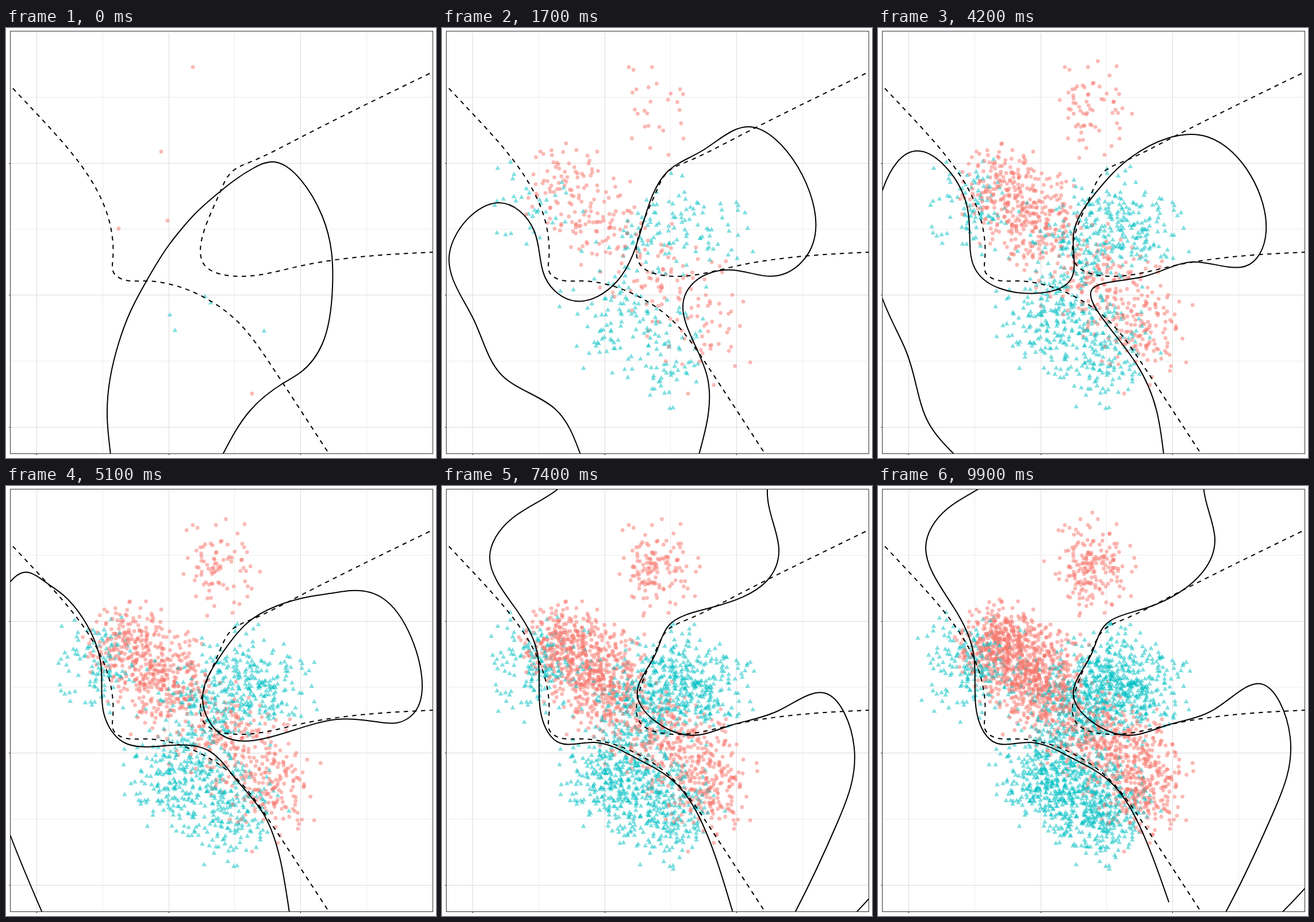
An HTML page with a canvas that plays this animation: 748x748 px, repeating every 10000 ms.

```html
<!DOCTYPE html>
<html lang="en">
<head>
<meta charset="utf-8">
<title>Decision boundary</title>
<style>
html, body { margin: 0; width: 100%; height: 100%; overflow: hidden; background: #fff; }
canvas { display: block; width: 100vw; height: 100vh; }
</style>
</head>
<body>
<canvas id="plot" width="748" height="748"></canvas>
<script>
const ctx = document.getElementById('plot').getContext('2d');
const STEPS = 100, STEP_MS = 100, PER_STEP = 36, SPLIT = 48;
const RED = '#F8766D', TEAL = '#00BFC4';
const BOX = { x: 7.5, y: 5.5, size: 735 };

const path = text => text.trim().split(/\s+/).map(p => p.split(',').map(Number));
const mix = (a, b, u) => a.map(([x, y], i) => [x + (b[i][0] - x) * u, y + (b[i][1] - y) * u]);

// Key points of the fitted boundary: one outline, then two
const blob = path(`182,742 176,675 181,610 196,548 217,492 245,439 262,410 283,378 305,350 330,322 373,284
  400,263 430,244 467,233 550,327 568,450 550,550 515,597 482,618 425,665 377,742`);
const folded = path(`241,742 196,662 105,605 55,507 13,392 98,304 160,352 180,435 232,475 305,440 350,339
  392,250 455,212 537,172 649,360 582,431 505,421 440,441 419,485 461,605 447,742`);
const necked = path(`133,742 88,687 66,620 48,560 -8,400 65,214 152,300 165,410 212,453 335,438 340,360
  380,285 440,225 575,190 675,355 640,414 550,407 460,433 372,455 450,585 497,742`);
const leftClosed = path(`63,742 8,609 -40,400 8,166 35,150 70,168 100,190 135,232 165,310 170,395 205,446
  275,452 350,459 400,510 450,574 493,742`);
const leftOpen = path(`-90,742 -90,500 -90,-80 225,-30 202,5 120,58 83,125 132,219 167,297 173,400 205,447
  265,446 335,472 400,511 447,575 506,742`);
const rightClosed = path(`600,182 655,195 724,350 712,392 698,405 680,412 650,411 620,407 575,406 490,428 380,436
  342,370 370,300 420,238 470,209 530,192 570,186`);
const rightOpen = path(`566,5 700,-150 950,350 570,840 614,742 688,585 717,455 665,360 585,391 500,417 425,433
  340,365 370,295 395,242 470,211 565,165 586,110`);

const trueBoundary = [
  path('12,105 57,153 130,238 178,330 186,400 187,425 205,438 245,440 320,457 400,508 460,585 562,741'),
  path('737,79 513,190 430,231 392,251 370,291 340,370 345,412 410,432 512,414 640,396 743,390')
];

// Clusters: weight, centre x, y, spread x, y
const redMix = [[.12, 372, 142, 31, 38], [.24, 213, 277, 34, 36], [.31, 281, 342, 40, 42], [.16, 383, 438, 48, 37], [.17, 463, 515, 35, 44]];
const tealMix = [[.11, 172, 318, 46, 40], [.28, 426, 345, 48, 42], [.14, 345, 385, 40, 40], [.23, 300, 507, 41, 38], [.24, 384, 562, 41, 42]];

let seed = 20417;
function rand() {
  seed = (seed + 0x6D2B79F5) | 0;
  let t = Math.imul(seed ^ (seed >>> 15), 1 | seed);
  t = (t + Math.imul(t ^ (t >>> 7), 61 | t)) ^ t;
  return ((t ^ (t >>> 14)) >>> 0) / 4294967296;
}

function sample(clusters) {
  let pick = rand(), i = 0;
  while (i < clusters.length - 1 && pick > clusters[i][0]) pick -= clusters[i++][0];
  const [, cx, cy, sx, sy] = clusters[i];
  const r = Math.sqrt(-2 * Math.log(1 - rand() * .975));
  const a = rand() * 2 * Math.PI;
  return [cx + sx * r * Math.cos(a), cy + sy * r * Math.sin(a)];
}

const points = [
  ...path('325,68 270,215 281,335 196,349 428,636').map(at => ({ at, red: true })),
  ...path('346,467 356,478 285,499 294,526 449,527').map(at => ({ at, red: false }))
];
const firstCount = points.length;
for (let i = 0; i < (STEPS - 1) * PER_STEP; i++) {
  const red = rand() < .5;
  points.push({ at: sample(red ? redMix : tealMix), red });
}

// Late on, the far parts of the boundary creep upward
function creep(pts, u) {
  return pts.map(([x, y]) => {
    const far = Math.max(0, Math.min(1, (Math.hypot(x - 340, y - 400) - 230) / 110));
    return [x, y - 18 * u * far];
  });
}

function outlines(step) {
  if (step < 17) return [{ pts: mix(blob, folded, step / 17) }];
  if (step < SPLIT) return [{ pts: mix(folded, necked, (step - 17) / 25) }];
  const u = Math.max(0, Math.min(1, (step - 59) / 15));
  const v = Math.max(0, (step - 74) / 25);
  return [
    { pts: creep(mix(leftClosed, leftOpen, u), v) },
    { pts: creep(mix(rightClosed, rightOpen, u), v), closed: true }
  ];
}

// Smooth cubic spline; its tangents are solved by relaxation
function strokeSpline({ pts, closed = false }) {
  const n = pts.length, segs = closed ? n : n - 1;
  const next = i => (i + 1) % n, prev = i => (i + n - 1) % n;
  const h = pts.map((p, i) => Math.hypot(pts[next(i)][0] - p[0], pts[next(i)][1] - p[1]) ** .75);
  const slope = (i, k) => (pts[next(i)][k] - pts[i][k]) / h[i];
  const m = pts.map(() => [0, 0]);
  for (let pass = 0; pass < 40; pass++) {
    for (let i = 0; i < n; i++) {
      const j = prev(i);
      for (const k of [0, 1]) {
        if (!closed && i === 0) m[i][k] = (3 * slope(0, k) - m[1][k]) / 2;
        else if (!closed && i === n - 1) m[i][k] = (3 * slope(j, k) - m[j][k]) / 2;
        else m[i][k] = (3 * (h[i] * slope(j, k) + h[j] * slope(i, k)) - h[i] * m[j][k] - h[j] * m[next(i)][k]) / (2 * (h[i] + h[j]));
      }
    }
  }
  ctx.beginPath();
  ctx.moveTo(...pts[0]);
  for (let i = 0; i < segs; i++) {
    const j = next(i), d = h[i] / 3, [p, q] = [pts[i], pts[j]];
    ctx.bezierCurveTo(p[0] + m[i][0] * d, p[1] + m[i][1] * d, q[0] - m[j][0] * d, q[1] - m[j][1] * d, ...q);
  }
  ctx.stroke();
}

function drawGrid(xs, ys, color) {
  ctx.strokeStyle = color;
  ctx.lineWidth = 1;
  ctx.beginPath();
  xs.forEach(x => { ctx.moveTo(x, BOX.y); ctx.lineTo(x, BOX.y + BOX.size); });
  ys.forEach(y => { ctx.moveTo(BOX.x, y); ctx.lineTo(BOX.x + BOX.size, y); });
  ctx.stroke();
}

function drawPoint({ at: [x, y], red }) {
  ctx.fillStyle = red ? RED : TEAL;
  ctx.beginPath();
  if (red) {
    ctx.arc(x, y, 3.4, 0, 2 * Math.PI);
  } else {
    ctx.moveTo(x, y - 4.8);
    ctx.lineTo(x + 4.3, y + 2.8);
    ctx.lineTo(x - 4.3, y + 2.8);
  }
  ctx.fill();
}

const majorX = [53.5, 283.5, 512.5], majorY = [235.5, 464.5, 694.5];

function draw(step) {
  ctx.fillStyle = '#fff';
  ctx.fillRect(0, 0, 748, 748);
  drawGrid([168.5, 397.5, 627.5], [120.5, 350, 579.5], '#ececec');
  drawGrid(majorX, majorY, '#dcdcdc');

  ctx.save();
  ctx.beginPath();
  ctx.rect(BOX.x, BOX.y, BOX.size, BOX.size);
  ctx.clip();
  ctx.globalAlpha = .5;
  points.slice(0, firstCount + step * PER_STEP).forEach(drawPoint);
  ctx.globalAlpha = 1;
  ctx.strokeStyle = '#000';
  ctx.lineWidth = 2;
  ctx.setLineDash([7.5, 7.5]);
  trueBoundary.forEach(pts => strokeSpline({ pts }));
  ctx.setLineDash([]);
  outlines(step).forEach(strokeSpline);
  ctx.restore();

  ctx.strokeStyle = '#333';
  ctx.lineWidth = 1;
  ctx.strokeRect(BOX.x, BOX.y, BOX.size, BOX.size);
  ctx.beginPath();
  majorX.forEach(x => { ctx.moveTo(x, 740); ctx.lineTo(x, 743); });
  majorY.forEach(y => { ctx.moveTo(5, y); ctx.lineTo(8, y); });
  ctx.stroke();
}

const start = performance.now();
let shown = -1;
function tick() {
  const step = Math.floor((performance.now() - start) / STEP_MS) % STEPS;
  if (step !== shown) draw(shown = step);
  requestAnimationFrame(tick);
}
tick();
</script>
</body>
</html>
```
